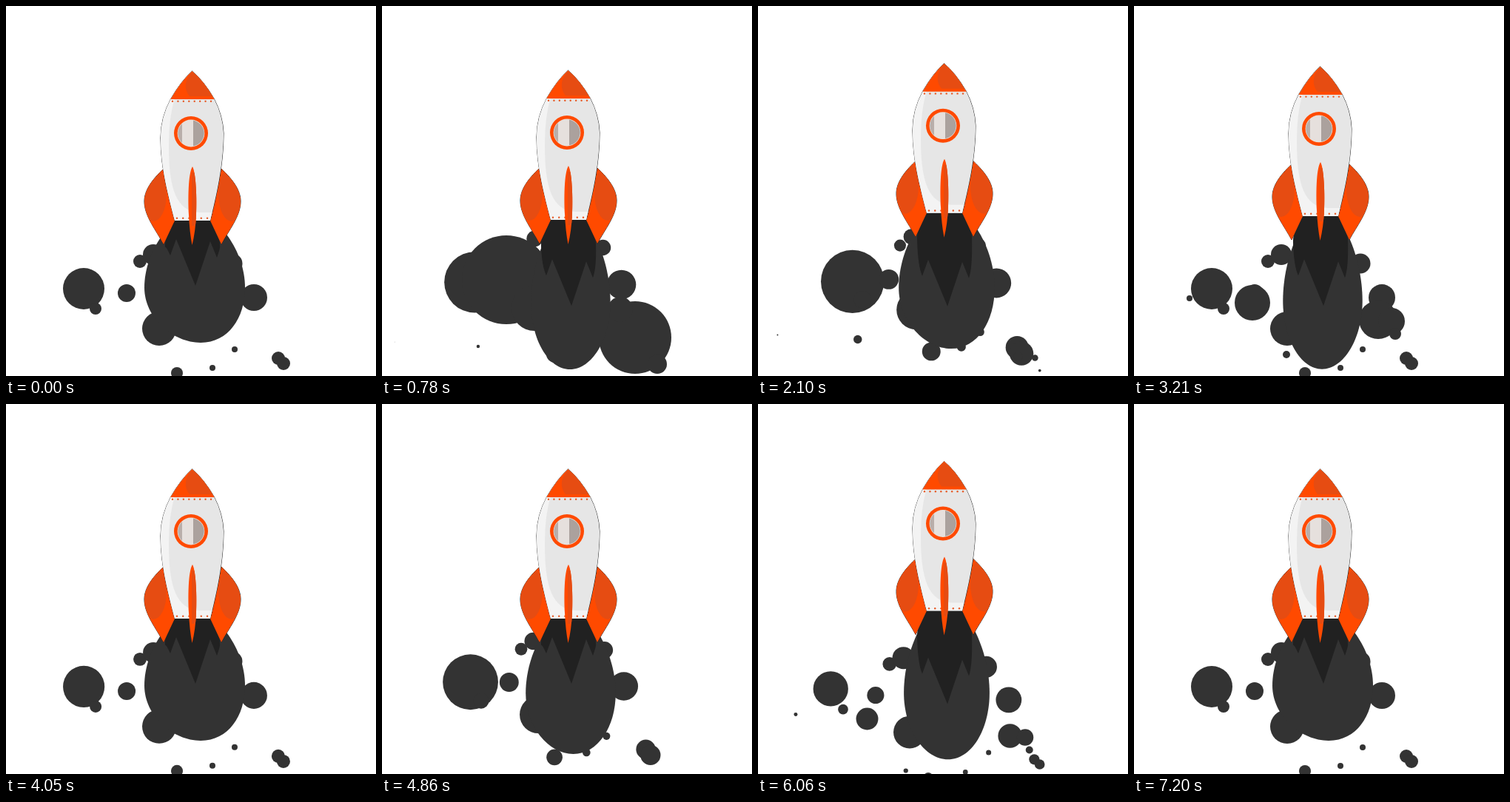
An HTML page with a canvas that plays this animation: 500x500 px, repeating every 7.23 s.

```html
<!DOCTYPE html>
<html lang="en">
<head>
<meta charset="utf-8">
<title>Rocket</title>
<style>
html, body { margin: 0; width: 100%; height: 100%; overflow: hidden; background: #fff; }
canvas { display: block; width: 500px; height: 500px; }
</style>
</head>
<body>
<canvas id="stage" width="500" height="500"></canvas>
<script>
const ctx = document.getElementById('stage').getContext('2d');
const STEP = 30, STEPS = 241;
const ORANGE = '#ff4a00', SHADE = '#e64c12', SMOKE = '#333', FLAME = '#212121';

// One uneven clock drives every part: [step, cycles done]
const CLOCK = [[0, 0], [26, 0.733], [70, 1.667], [107, 3.133], [162, 4.8], [202, 6.467], [240, 7]];

// Puffs in mid flight: x, y, r
const PUFFS = [
  [105, 382, 28], [121, 409, 8], [163, 388, 12], [181, 345, 9],
  [199, 336, 14], [207, 436, 23], [231, 496, 8], [279, 489, 4],
  [309, 464, 4], [335, 394, 18], [306, 348, 13.5], [368, 476, 9], [375, 483, 9]
];
const DRIFT = [
  [160, 401, 24], [75, 395, 4], [206, 471, 5],
  [330, 424, 26], [348, 426, 18], [353, 443, 8]
];
const BURST = [[168, 370, 60], [342, 448, 49], [322, 410, 17], [372, 484, 13], [206, 408, 31]];

const mix = (a, b, k) => a + (b - a) * k;
const unit = (v) => Math.min(1, Math.max(0, v));

function ramp(v, from, to) {
  const k = unit((v - from) / (to - from));
  return k * k * (3 - 2 * k);
}

// Rise from a to b, stay, fall from c to d
const pulse = (v, a, b, c, d) => ramp(v, a, b) * (1 - ramp(v, c, d));

function clock(n) {
  const i = CLOCK.findIndex(([step]) => step >= Math.max(n, 1));
  const [n0, c0] = CLOCK[i - 1], [n1, c1] = CLOCK[i];
  return mix(c0, c1, (n - n0) / (n1 - n0)) % 1;
}

function disc(x, y, r, color) {
  if (r <= 0) return;
  ctx.fillStyle = color;
  ctx.beginPath();
  ctx.arc(x, y, r, 0, 7);
  ctx.fill();
}

function shape(d, color) {
  const path = new Path2D(d);
  ctx.fillStyle = color;
  ctx.fill(path);
  return path;
}

function inside(path, draw) {
  ctx.save();
  ctx.clip(path);
  draw();
  ctx.restore();
}

function oval(x, y, rx, ry, color) {
  ctx.fillStyle = color;
  ctx.beginPath();
  ctx.ellipse(x, y, rx, ry, 0, 0, 7);
  ctx.fill();
}

// Smoke leaves the plume while k grows from 0 to 1
const emerge = (x, y, r, k) => disc(mix(252, x, k), mix(350, y, k), r * k, SMOKE);

function puffs(c) {
  const p = (c + 1 / 3) % 1;
  const fresh = p > 0.9;
  const q = fresh ? 0
    : 0.77 * ramp(p, 0, 0.33) + 0.23 * ramp(p, 0.46, 0.8) + ramp(p, 0.8, 0.9);
  const grow = fresh ? ramp(p, 0.9, 1) : 1;
  const fade = fresh ? 1 : 1 - ramp(p, 0.8, 0.9);
  const s = q - 0.77;
  for (const [x, y, r] of PUFFS) {
    // Far puffs shrink, near ones still swell
    const shrink = (Math.hypot(x - 252, y - 340) - 85) / 100;
    const fall = 42 - 0.2 * Math.abs(x - 252);
    emerge(x + 0.2 * (x - 252) * s, y + fall * s, r * (1 - shrink * s) * fade, grow);
  }
}

function drift(c) {
  const u = unit((c - 0.133) / 0.64) ** 1.5;
  for (const [x, y, r] of DRIFT) {
    emerge(x + 0.36 * (x - 252) * u, y + 65 * u, r * (1 - u), ramp(c, 0, 0.133));
  }
}

function burst(c) {
  const k = pulse(c, 0.667, 0.73, 0.735, 0.8);
  BURST.forEach(([x, y, r]) => emerge(x, y, r, k));
}

function plume(c, base) {
  const swell = Math.max(pulse(c, 0, 0.14, 0.25, 0.85), pulse(c, 0.66, 0.73, 0.73, 0.87));
  const top = base - 9, bottom = 455 + 36 * swell, w = 68 - 14.4 * swell;
  const cy = mix(top, bottom, 0.572), x = 255, foot = mix(263, 254, swell);
  const up = cy - 0.5 * (cy - top), down = cy + 0.55 * (bottom - cy);
  shape(`M${x - w} ${cy} C${x - w} ${up} ${x - 0.45 * w} ${top} ${x} ${top}
    C${x + 0.45 * w} ${top} ${x + w} ${up} ${x + w} ${cy}
    C${x + w} ${down} ${foot + 0.55 * w} ${bottom} ${foot} ${bottom}
    C${foot - 0.55 * w} ${bottom} ${x - w} ${down} ${x - w} ${cy} Z`, SMOKE);
}

function flame(c, base) {
  const len = 88 + 38 * pulse(c, 0, 0.17, 0.7, 0.8);
  const y = (d) => base + len + d;
  shape(`M228 ${base} Q214 ${base + 22} 215 ${base + 36}
    Q216 ${y(-54)} 222 ${y(-41)} L230 ${y(-63)} L256 ${y(0)}
    L276 ${y(-60)} L285 ${y(-38)} Q290 ${y(-52)} 289 ${base + 34}
    Q289 ${base + 20} 276 ${base} Z`, FLAME);
}

function edge(path) {
  ctx.strokeStyle = '#222';
  ctx.lineWidth = 1;
  ctx.stroke(path);
}

function fin() {
  const path = new Path2D('M213 220 C196 236 187 250 187 264 C187 284 203 303 213 322 L228 290 C222 265 216 240 213 220 Z');
  edge(path);
  ctx.fillStyle = ORANGE;
  ctx.fill(path);
  inside(path, () => oval(199, 254, 18, 37, SHADE));
}

function fins() {
  fin();
  ctx.save();
  ctx.translate(504, 0);
  ctx.scale(-1, 1);
  fin();
  ctx.restore();
}

function rivets(from, to, count, y) {
  for (let i = 0; i < count; i++) {
    disc(mix(from, to, i / (count - 1)), y, 1.2, '#e75a26');
  }
}

function hull() {
  const outline = new Path2D('M251.500 88 Q237 101 223 125 Q209 151 209 178 C209 220 220 258 228 290 H276 C284 258 294 215 294 172 Q293 148 281 125 Q267 101 251.500 88 Z');
  edge(outline);
  inside(outline, () => {
    ctx.fillStyle = '#e6e6e6';
    ctx.fillRect(200, 88, 100, 202);
    shape('M200 125 H228 Q220 150 220 190 C220 246 230 278 262 279 H300 V291 H200 Z', '#f3f3f3');
    ctx.fillStyle = ORANGE;
    ctx.fillRect(200, 86, 100, 40);
    shape('M251 89 Q236 107 248 122 H285 V110 Z', SHADE);
  });
  rivets(225, 277, 8, 128.7);
  rivets(231, 272, 6, 286.8);
}

function porthole() {
  disc(250, 172, 23, ORANGE);
  disc(250, 172, 18.4, '#e8dcd6');
  const glass = new Path2D();
  glass.arc(250, 172, 17.7, 0, 7);
  const pane = (x, w, color) => {
    ctx.fillStyle = color;
    ctx.fillRect(x, 150, w, 44);
  };
  inside(glass, () => {
    pane(230, 8, '#b9aeaa');
    pane(238, 15, '#e6e0dd');
    pane(253, 18, '#aba19d');
  });
}

function keel() {
  const path = shape('M252 217 C246 226 246 262 247 282 Q248 305 251.500 323 Q256 305 257 282 C258 262 257 226 252 217 Z', ORANGE);
  inside(path, () => {
    ctx.fillStyle = SHADE;
    ctx.fillRect(251, 225, 7, 72);
  });
}

function draw(n) {
  const c = clock(n);
  const lift = -10.5 * pulse(c, 0, 0.24, 0.66, 0.75);
  ctx.fillStyle = '#fff';
  ctx.fillRect(0, 0, 500, 500);
  puffs(c);
  drift(c);
  burst(c);
  plume(c, 290 + lift);
  flame(c, 290 + lift);
  ctx.save();
  ctx.translate(0, lift);
  fins();
  hull();
  porthole();
  keel();
  ctx.restore();
}

const start = performance.now();
function tick(now) {
  draw(Math.floor(Math.max(0, now - start) / STEP) % STEPS);
  requestAnimationFrame(tick);
}
draw(0);
requestAnimationFrame(tick);
</script>
</body>
</html>
```
